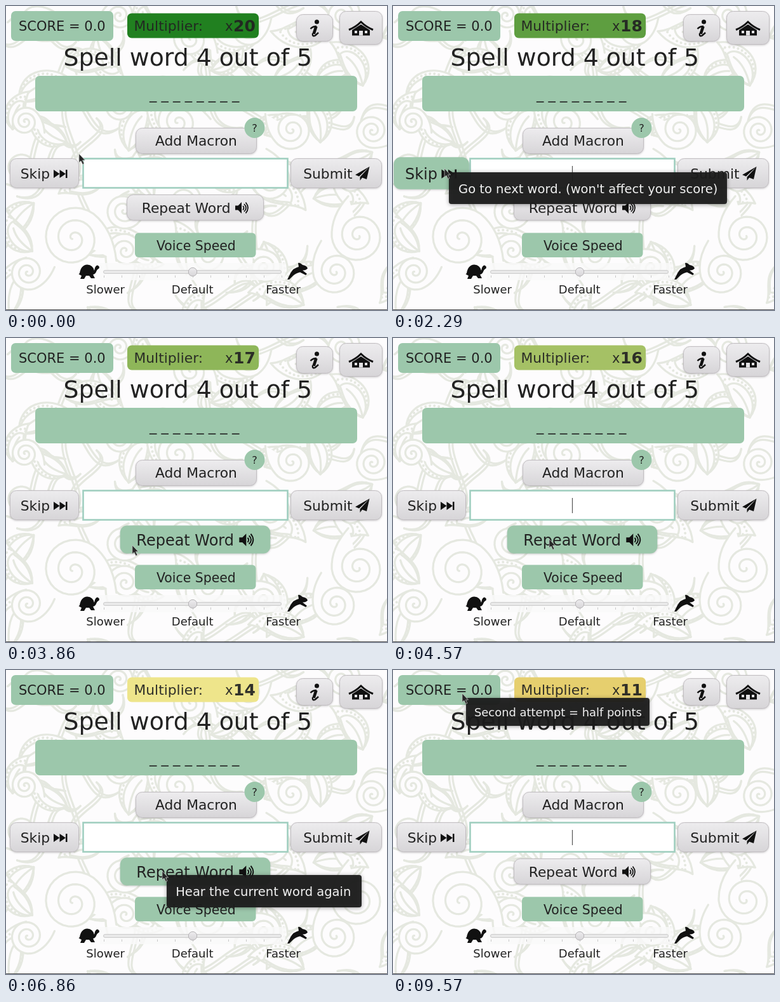
These frames come from a looping animation (600x479 px, 9.71 s). An HTML page:

```html
<!DOCTYPE html>
<html lang="en">
<head>
<meta charset="utf-8">
<title>Spelling quiz</title>
<style>
html, body { margin: 0; width: 100%; height: 100%; overflow: hidden; background: #fdfcfd; }
svg { display: block; }
text { font: 21.8px "DejaVu Sans", sans-serif; fill: #222; white-space: pre; }
.green { fill: #9cc7ab; }
.button rect { fill: url(#metal); stroke: #c1bdc1; filter: drop-shadow(0 1px 1.5px #0003); }
.button { transform-box: fill-box; transform-origin: center; }
.button.hot { transform: scale(1.1); }
.button.hot rect { fill: #9cc7ab; stroke: none; }
.icon { fill: #111; }
.line { fill: none; stroke: #111; }
.small text { font-size: 18px; }
.tip { visibility: hidden; }
.tip rect { fill: #1c1c1c; fill-opacity: .94; filter: drop-shadow(0 1px 3px #0006); }
.tip text { fill: #f1f1f1; font-size: 19.55px; }
#pattern path { fill: #fdfcfd; stroke: #e5e8e0; stroke-width: 3.2; stroke-linecap: round; stroke-linejoin: round; }
#pattern .open { fill: none; }
#pattern .beads { fill: none; stroke-width: 4; stroke-dasharray: 0 7; }
</style>
</head>
<body>
<svg width="600" height="479" viewBox="0 0 600 479">
  <defs>
    <linearGradient id="metal" x2="0" y2="1">
      <stop stop-color="#edecee"/><stop offset="1" stop-color="#d7d5d8"/>
    </linearGradient>
  </defs>
  <g id="pattern"></g>
  <path d="M0 478.5H600" stroke="#555"/>

  <rect class="green" x="8" y="8" width="161" height="47" rx="7"/>
  <text x="20" y="39" style="font-size:21px">SCORE = 0.0</text>
  <rect id="badge" x="191" y="11.5" width="207" height="39" rx="7"/>
  <g opacity=".92">
    <text x="201.5" y="39">Multiplier:</text>
    <text x="345" y="39" style="font-size:21px">x</text>
    <text id="count" x="358" y="40" style="font-size:25px;font-weight:bold"></text>
  </g>

  <g class="button">
    <rect x="457.5" y="13.5" width="57" height="42" rx="10"/>
    <circle class="icon" cx="489.5" cy="25" r="3.5"/>
    <path class="line" stroke-width="4.6" d="M488.5 32L484.6 44"/>
    <path class="line" stroke-width="2.4" d="M479.5 36Q483 32 489 32M483 43Q482 49 487 46.5L492 42"/>
  </g>
  <g class="button">
    <rect x="525.5" y="8.5" width="67" height="52" rx="10"/>
    <path class="line" stroke-width="3" d="M540 37.5Q551 33 559 25Q567 33 578 37.5"/>
    <path class="icon" d="M545 38L559 29L573 38V46.500H545z"/>
    <path fill="#e3e2e4" d="M549 39h4v4h-4zM565 39h4v4h-4zM556 39h6v7.500h-6z"/>
  </g>

  <text x="90.5" y="94" style="font-size:37.8px">Spell word 4 out of 5</text>
  <rect class="green" x="46" y="110" width="507" height="56" rx="7"/>
  <text x="226" y="147" style="font-size:22.7px">_ _ _ _ _ _ _ _</text>

  <g class="button">
    <rect x="204.5" y="192.5" width="190" height="40" rx="10"/>
    <text x="235" y="220">Add Macron</text>
  </g>
  <circle class="green" cx="391.5" cy="192" r="16"/>
  <text x="391.5" y="197.5" text-anchor="middle" style="font-size:16px">?</text>

  <rect x="121.5" y="240.5" width="322" height="46" fill="#fff" stroke="#a0cfc0" stroke-width="2.6"/>
  <path id="caret" d="M282.5 252V276" stroke="#555" stroke-width="1.2"/>

  <g class="button" id="skip">
    <rect x="6.5" y="240.5" width="108" height="46" rx="10"/>
    <text x="22.7" y="272">Skip</text>
    <path class="icon" d="M75 258l9.500 6.500-9.500 6.500zM84.500 258l9.500 6.500-9.500 6.500zM94 258h2.500v13h-2.500z"/>
  </g>
  <g class="button">
    <rect x="448.5" y="240.5" width="143" height="46" rx="10"/>
    <text x="468.2" y="272">Submit</text>
    <path class="icon" d="M572.500 253L550 266l6 2.500zM572.500 253L557.500 269.500V275l3.500-4.500 7 2.500z"/>
  </g>
  <g class="button" id="repeat">
    <rect x="190.5" y="297.5" width="215" height="40" rx="10"/>
    <text x="213.8" y="326">Repeat Word</text>
    <path class="icon" d="M361 314.500h4.500l5.500-5.500v18l-5.500-5.500h-4.500z"/>
    <path class="line" stroke-width="1.7" d="M373 315q3 3 0 6.500M375 312q6 6 0 12M377.500 309.500q7 8.500 0 17"/>
  </g>

  <rect class="green" x="203" y="357.5" width="190.5" height="38.5" rx="6"/>
  <text x="237" y="385" style="font-size:20.4px">Voice Speed</text>

  <rect x="148" y="405" width="292" height="27" fill="#fafafa" opacity=".8"/>
  <g id="ticks" stroke="#c8c8c8"></g>
  <rect x="153.5" y="416.5" width="280" height="5" rx="2.5" fill="#e9e9e9" stroke="#cbcbcb"/>
  <circle cx="294" cy="419" r="6.7" fill="url(#metal)" stroke="#b4b2b4"/>
  <g class="icon">
    <path d="M116 421Q118 408 128 407.500Q137 408 139 417Q140 409 144 408.500Q148 410 146.500 413.500Q143 415 142 419Q140 423 137 423L140 429H134L131 425H126L123 430H117L119 425L114.500 422.500z"/>
    <path d="M443 431L448 421Q452 413 461 411L460 405Q463 404 467 408Q474 409 475 413.500Q472 417 467 416.500L474 422L472 424L463 419.500Q456 421 452 425L446 431z"/>
  </g>
  <g class="small">
    <text x="126.3" y="453">Slower</text>
    <text x="260.8" y="453">Default</text>
    <text x="409.3" y="453">Faster</text>
  </g>

  <g class="tip">
    <rect x="88" y="262" width="438" height="50" rx="4"/>
    <text x="103" y="294.5">Go to next word. (won't affect your score)</text>
  </g>
  <g class="tip">
    <rect x="253" y="323" width="307" height="51" rx="4"/>
    <text x="267.2" y="355.5">Hear the current word again</text>
  </g>
  <g class="tip">
    <rect x="115" y="44" width="289" height="44" rx="4"/>
    <text x="128" y="73" style="font-size:17.9px">Second attempt = half points</text>
  </g>
  <path id="cursor" d="M0 0V13.500L3 11L5.700 16.500L8 15.300L5.500 10H9.500z" fill="#262626" stroke="#ccc" stroke-width=".7"/>
</svg>
<script>
const LOOP = 9710, STEP = 142.8;
const $ = id => document.getElementById(id);

function addPath(parent, d, transform = '', cls = '') {
  const p = document.createElementNS('http://www.w3.org/2000/svg', 'path');
  p.setAttribute('d', d);
  p.setAttribute('transform', transform);
  p.setAttribute('class', cls);
  $(parent).append(p);
}

let seed = 11;
function random(min, max) {
  seed = seed * 16807 % 2147483647;
  return min + (max - min) * seed / 2147483647;
}

const place = (x, y) =>
  `translate(${x} ${y}) rotate(${random(0, 360)}) scale(1 ${random(-1, 1) < 0 ? -1 : 1})`;

// Long double curve behind the leaves
function vine(x, y, n) {
  const at = place(x, y);
  for (const gap of [0, 9]) {
    addPath('pattern', `M0 0C${n * .3} ${-n * .5 - gap} ${n * .8} ${n * .5 - gap} ${n} 0`, at, 'open');
  }
}

// Spiral with a curved tail
function fern(x, y, r) {
  const turns = 16;
  const points = [];
  for (let a = .6; a < turns; a += .2) {
    const q = r * a / turns;
    points.push(`${q * Math.cos(a - turns)} ${q * Math.sin(a - turns)}`);
  }
  addPath('pattern', `M${points.join('L')}Q${r} ${r * .8} ${r * .3} ${r * 1.5}`, place(x, y));
}

// Curved leaf with a beaded rim
function leaf(x, y, n) {
  const at = place(x, y);
  const outline = k => `M0 0C${n * .15} ${-n * .5 * k} ${n * .75} ${-n * .45 * k} ${n * k} 0` +
    `C${n * .7} ${-n * .05} ${n * .4} ${n * .28 * k} 0 0`;
  addPath('pattern', outline(1), at);
  addPath('pattern', outline(.72), at);
  addPath('pattern', outline(.86), at, 'beads');
  addPath('pattern', `M0 0Q${n * .35} ${-n * .16} ${n * .6} ${-n * .08}`, at, 'open');
}

// Fill a jittered grid, so the pattern is even but not regular
function scatter(shape, cell, min, max) {
  for (let y = cell / 3; y < 500; y += cell) {
    for (let x = cell / 3; x < 620; x += cell) {
      shape(x + random(-.3, .3) * cell, y + random(-.3, .3) * cell, random(min, max));
    }
  }
}
scatter(vine, 85, 90, 160);
scatter(leaf, 92, 60, 100);
scatter(fern, 125, 22, 36);
fern(106, 366, 50);
fern(555, 362, 42);

for (let x = 154.5; x < 440; x += 28) addPath('ticks', `M${x} 424.5v3.5`);

// Pointer moves: start, end, then the place reached
const start = [115, 233];
const moves = [
  [0, 800, 81, 256],
  [2700, 3140, 109, 345],
  [3250, 4250, 246, 317],
  [6950, 7860, 112, 47],
  [7900, 8100, 109, 37]
];
const rests = [[800, 2700], [4250, 6950], [8100, LOOP]];
const TIP_DELAY = 1000, TIP_LINGER = 500;
const tips = document.querySelectorAll('.tip');

const mix = (a, b, k) => a.map((v, i) => v + (b[i] - v) * k);
const clamp = k => Math.max(0, Math.min(1, k));
const smooth = k => k * k * (3 - 2 * k);

function pointer(t) {
  return moves.reduce((from, [a, b, ...to]) => mix(from, to, smooth(clamp((t - a) / (b - a)))), start);
}

function badgeColour(t) {
  const turn = 6900;
  const warm = mix([33, 128, 32], [240, 230, 140], clamp(t / turn) ** 1.1);
  return mix(warm, [229, 206, 108], clamp((t - turn) / (LOOP - turn)));
}

function show(el, on) { el.style.visibility = on ? 'visible' : 'hidden'; }

function hover(id, x, y) {
  const box = $(id).firstElementChild.getBBox();
  const inside = x > box.x && x < box.x + box.width && y > box.y && y < box.y + box.height;
  $(id).classList.toggle('hot', inside);
}

function draw() {
  const t = Math.floor((performance.now() % LOOP + 5) / STEP) * STEP % LOOP;
  const [x, y] = pointer(t);
  $('cursor').setAttribute('transform', `translate(${x} ${y})`);
  hover('skip', x, y);
  hover('repeat', x, y);
  $('badge').style.fill = `rgb(${badgeColour(t).map(Math.round)})`;
  $('count').textContent = 20 - Math.floor(t / 1000);
  show($('caret'), (t + 750) % 1000 < 500);
  rests.forEach(([from, to], i) => show(tips[i], t >= from + TIP_DELAY && t < to + TIP_LINGER));
  requestAnimationFrame(draw);
}
draw();
</script>
</body>
</html>
```
